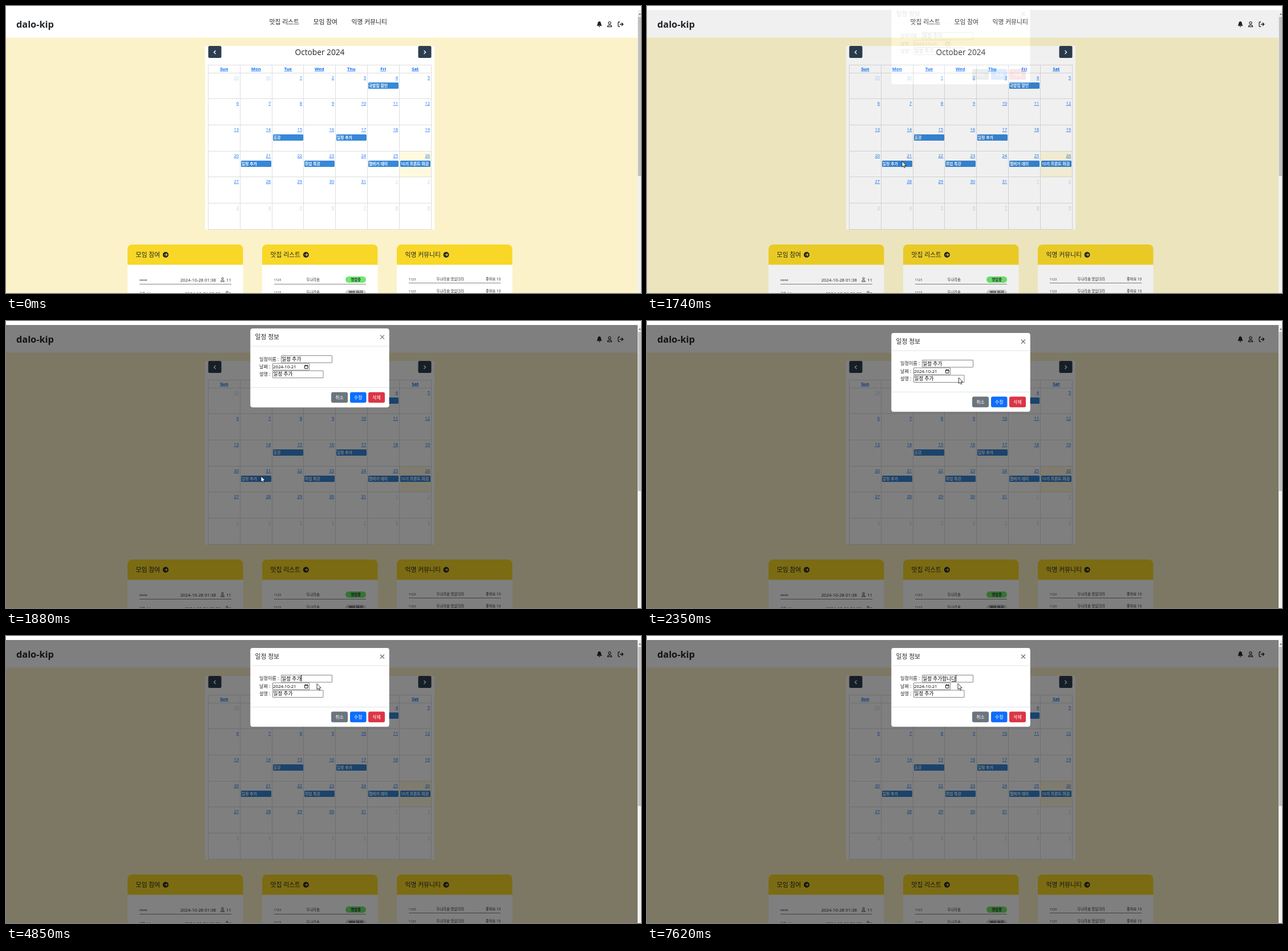
Recreate the animation shown at these times as an HTML page. Size 1113 by 503 pixels, loop 8000 ms.

```html
<!DOCTYPE html>
<html lang="ko">
<head>
<meta charset="utf-8">
<title>Calendar</title>
<style>
html, body { margin: 0; width: 100%; height: 100%; overflow: hidden; background: #fff; }
svg { display: block; width: 1113px; height: 503px; }
text { font-family: "Open Sans", "Noto Sans CJK KR", "Noto Sans CJK JP", sans-serif; white-space: pre; }
</style>
</head>
<body>
<svg viewBox="0 0 1113 503">
  <defs>
    <clipPath id="page"><rect y="7" width="1107" height="496"/></clipPath>
    <g id="person" fill="none" stroke="#212529" stroke-width="1.1">
      <circle cy="-2.4" r="2.1"/>
      <path d="M-3.7 4.4C-3.7 .4 3.7 .4 3.7 4.4Z" stroke-linejoin="round"/>
    </g>
    <g id="go">
      <circle r="5" fill="#212529"/>
      <path d="M-2.7 0H2.5M.3-2.3L2.6 0 .3 2.3" fill="none" stroke="#f8d727" stroke-width="1.2"/>
    </g>
  </defs>
  <g id="base"></g>
  <g clip-path="url(#page)">
    <path id="shade" fill-rule="evenodd"/>
    <g id="modal"></g>
  </g>
  <path id="cursor" d="M0 0V10.2L2.3 8.1 3.9 11.6 5.5 10.9 4 7.5H7.2Z" fill="#fff" stroke="#111" stroke-width=".8"/>
</svg>
<script>
const $ = id => document.getElementById(id);
const DARK = '#212529', BLUE = '#0d6efd';

const rect = (x, y, w, h, fill, rx = 0, more = '') =>
  `<rect x="${x}" y="${y}" width="${w}" height="${h}" fill="${fill}" rx="${rx}" ${more}/>`;
const text = (x, y, size, str, fill = DARK, more = '') =>
  `<text x="${x}" y="${y}" font-size="${size}" fill="${fill}" ${more}>${str}</text>`;
const line = (d, stroke, width = 1) =>
  `<path d="${d}" fill="none" stroke="${stroke}" stroke-width="${width}"/>`;
const use = (id, x, y, s = 1) => `<use href="#${id}" transform="translate(${x} ${y}) scale(${s})"/>`;
const BOLD = 'font-weight="700"', SEMI = 'font-weight="600"', MEDIUM = 'font-weight="500"';
const MID = 'text-anchor="middle"', END = 'text-anchor="end"', LINK = 'text-decoration="underline"';

function header() {
  return rect(0, 7, 1107, 48.5, '#fff') + rect(0, 55.5, 1107, 447.5, '#fbf2c9') +
    text(18, 38, 16.3, 'dalo-kip', DARK, BOLD) +
    text(461.5, 32, 10.8, '맛집 리스트') + text(538.5, 32, 10.8, '모임 참여') + text(605.5, 32, 10.8, '익명 커뮤니티') +
    `<path d="M1040 27C1036.6 27.4 1037.4 31 1036.6 32.6L1035.4 34.8H1044.6L1043.4 32.6C1042.6 31 1043.4 27.4 1040 27ZM1038.6 35.5H1041.4A1.4 1.4 0 0 1 1038.6 35.5Z" fill="${DARK}"/>` +
    use('person', 1058, 32) +
    line('M1076 28H1074.2Q1073 28 1073 29.2V34.8Q1073 36 1074.2 36H1076M1075.8 32H1081.5M1079 29.3L1081.7 32 1079 34.7', DARK, 1.3);
}

function scrollbar() {
  return rect(1107, 7, 6, 496, '#f1f1f1') + rect(1107.7, 19, 5.3, 279, '#c1c1c1') +
    '<path d="M1108.6 15.5L1111 12.5 1113 15.5Z" fill="#777"/>';
}

const colX = i => Math.floor(354.4 + 55.8 * i);
const rowY = i => Math.floor(117 + 45.7 * i);

function calendar() {
  let s = rect(349, 70, 402, 322, '#fff') + text(550, 85.5, 13.7, 'October 2024', DARK, MID);
  [[354.5, 1], [722.5, -1]].forEach(([x, dir]) => {
    const cx = x + 11.5;
    s += rect(x, 70, 23, 21, '#2c3e50', 2.5) +
      line(`M${cx + dir * 1.5} 78L${cx - dir * 1.5} 81 ${cx + dir * 1.5} 84`, '#fff', 1.4);
  });
  s += rect(colX(6), rowY(3), 56, 46, '#fffadf');
  for (let i = 0; i < 8; i++) s += line(`M${colX(i) + .5} 103V392`, '#ddd');
  s += line('M354 103.5H746', '#ddd');
  for (let i = 0; i < 7; i++) s += line(`M354 ${rowY(i) + .5}H746`, '#ddd');
  ['Sun', 'Mon', 'Tue', 'Wed', 'Thu', 'Fri', 'Sat'].forEach((d, i) => {
    s += text(colX(i) + 28.3, 112.8, 7.7, d, BLUE, `${BOLD} ${MID} ${LINK}`);
  });
  for (let i = 0; i < 42; i++) {
    const day = new Date(2024, 8, 29 + i);
    s += text(colX(i % 7 + 1) - 1.8, rowY(i / 7 | 0) + 11.2, 7.6, day.getDate(), BLUE,
      `${END} ${LINK} opacity="${day.getMonth() == 9 ? 1 : .3}"`);
  }
  [[5, 0, '국밥집 할인'], [2, 2, '휴강'], [4, 2, '일정 추가'], [1, 3, '일정 추가'],
   [3, 3, '취업 특강'], [5, 3, '햄버거 데이'], [6, 3, '10기 프론트 마감']].forEach(([c, r, name]) => {
    s += rect(colX(c) + 2, rowY(r) + 17, 53, 11, '#3788d8', 1.5) +
      text(colX(c) + 2.7, rowY(r) + 24.9, 6.9, name, '#fff', SEMI);
  });
  return s;
}

function card(x, title, arrowX) {
  const top = bottom => `M${x} ${bottom}V426a8 8 0 0 1 8-8h186.5a8 8 0 0 1 8 8V${bottom}Z`;
  return `<path d="${top(503)}" fill="#fff"/><path d="${top(453.5)}" fill="#f8d727"/>` +
    text(x + 14.5, 439.8, 10.8, title, DARK, MEDIUM) + use('go', arrowX, 436);
}

function cards() {
  let s = card(213, '모임 참여', 279.8) + card(449, '맛집 리스트', 525.8) + card(685, '익명 커뮤니티', 771.5);
  [['owse', '2024-10-28 01:38', 11, 368], ['고운_14', '2024-10-26 22:28', 2, 376]].forEach(([who, date, n, x], i) => {
    const y = 482.7 + 24 * i;
    s += text(233.5, y - .5, 5.8, who) + text(x, y, 7.8, date, DARK, END) +
      use('person', x + 11.5, y - 3.2, .8) + text(395, y, 7.8, n, DARK, END);
  });
  s += line('M234 487.5H395M470 487.5H631M706 485.5H867', '#777', .9);
  [['영업중', '#6fe86f'], ['영업 마감', '#d3d3d3']].forEach(([state, fill], i) => {
    const y = 474 + 23.3 * i;
    s += text(469.5, 481.7 + 22 * i, 5.5, 1123) + text(526.5, 481.8 + 22 * i, 6.3, '두나리솜') +
      rect(595, y, 36, 11, fill, 5.5) + text(613, y + 7.9, 6.4, state, DARK, `${SEMI} ${MID}`);
  });
  for (const y of [480.6, 501.6])
    s += text(705.5, y, 5.5, 1123) + text(754.5, y + .2, 6.3, '두나리솜 맛있더라') + text(867, y + .2, 6.3, '좋아요 10', DARK, END);
  return s;
}

function modal() {
  const field = (x, y, w, h) => rect(x + .5, y + .5, w - 1, h - 1, '#fff', .5, 'stroke="#767676" stroke-width=".9"');
  let s = rect(428.5, 21, 243, 138, '#fff', 4) +
    line('M428.5 52H671.5M428.5 124.5H671.5', '#dee2e6') +
    text(436.5, 40, 10.8, '일정 정보') + line('M656 32.5L663 39.5M663 32.5L656 39.5', '#6b6b6b', 1.1) +
    text(444, 77.4, 8.1, '일정이름 :') + text(444, 90.8, 8.1, '날짜 :') + text(444, 104.2, 8.1, '설명 :') +
    field(482, 68, 90, 13.5) + field(467, 81.5, 65, 13) + field(467, 94.5, 89.5, 13.5) +
    text(468, 91, 7.8, '2024-10-21', '#000') + text(468.5, 104.2, 8.6, '일정 추가', '#000') +
    rect(523.5, 86, 5.5, 5.2, 'none', .5, 'stroke="#111"') + line('M523 86.5H529.5M524.5 84.5V86M528 84.5V86', '#111') +
    `<text id="name" x="483.3" y="77.5" font-size="8.6"/>` +
    `<path id="under" stroke="#000" stroke-width=".8"/><path id="caret" stroke="#000"/>`;
  [[570, 29, '취소', '#6c757d'], [603, 28.5, '수정', BLUE], [635, 29, '삭제', '#dc3545']].forEach(([x, w, label, fill]) => {
    s += rect(x, 132.5, w, 18.7, fill, 3) + text(x + w / 2, 144.8, 7.9, label, '#fff', `${MID} ${MEDIUM}`);
  });
  return s;
}

$('base').innerHTML = header() + calendar() + cards() + scrollbar();
$('modal').innerHTML = modal();

const clamp = v => Math.min(1, Math.max(0, v));
const easeOut = (v, power) => 1 - (1 - v) ** power;

// time, x, y, easing power of the way to this point
const moves = [[440, 982, 488, 1], [1190, 465, 274, 1.7], [1400, 447, 272, 1], [1900, 447, 272, 1],
  [2410, 550, 93, 1.6], [2550, 543, 74, 1], [2690, 540, 68, 1], [3040, 545, 83.5, 1]];
const typed = [[0, ''], [5830, 'ㅎ'], [5930, '하'], [6030, '합'], [6240, '합ㄴ'], [6290, '합니'], [6490, '합니ㄷ'], [6560, '합니다']];
const blinks = [2690, 3240, 3830, 4450, 4850, 7090, 7620];

// The screen refreshes about 15 times a second while things move.
function hold(t) {
  const from = t < 1605 ? 440 : 1610;
  return from + Math.floor((t - from + 5) / 67) * 67;
}

function place(t) {
  const i = moves.findIndex(m => m[0] > t);
  if (i < 0) return moves.at(-1).slice(1, 3);
  if (!i) return moves[0].slice(1, 3);
  const [t0, x0, y0] = moves[i - 1], [t1, x1, y1, power] = moves[i];
  const k = easeOut((t - t0) / (t1 - t0), power);
  return [x0 + (x1 - x0) * k, y0 + (y1 - y0) * k];
}

function draw(t) {
  const h = hold(t), fade = clamp((h - 1726) / 150);
  const shift = -24.3 * (1 - easeOut(clamp((h - 1726) / 300), 1.6));

  $('shade').setAttribute('d', `M0 7H1107V503H0ZM432.5 ${21 + shift}h235a4 4 0 0 1 4 4v130a4 4 0 0 1-4 4h-235a4 4 0 0 1-4-4v-130a4 4 0 0 1 4-4z`);
  $('shade').setAttribute('opacity', fade / 2);
  $('modal').setAttribute('opacity', fade);
  $('modal').setAttribute('transform', `translate(0 ${shift})`);

  const extra = typed.findLast(k => k[0] <= t)[1];
  const x = 517.5 + 8 * extra.length;
  $('name').textContent = '일정 추가' + extra;
  $('under').setAttribute('d', extra ? `M${x - 7.5} 79.6H${x}` : '');
  const lit = blinks.filter(b => b <= t).length % 2;
  $('caret').setAttribute('d', lit ? `M${x} 68.5V79.5` : '');

  $('cursor').setAttribute('transform', `translate(${place(h)})`);
  $('cursor').setAttribute('visibility', t < 440 ? 'hidden' : 'visible');
}

const start = performance.now();
function tick() {
  draw((performance.now() - start) % 8000);
  requestAnimationFrame(tick);
}
tick();
</script>
</body>
</html>
```
